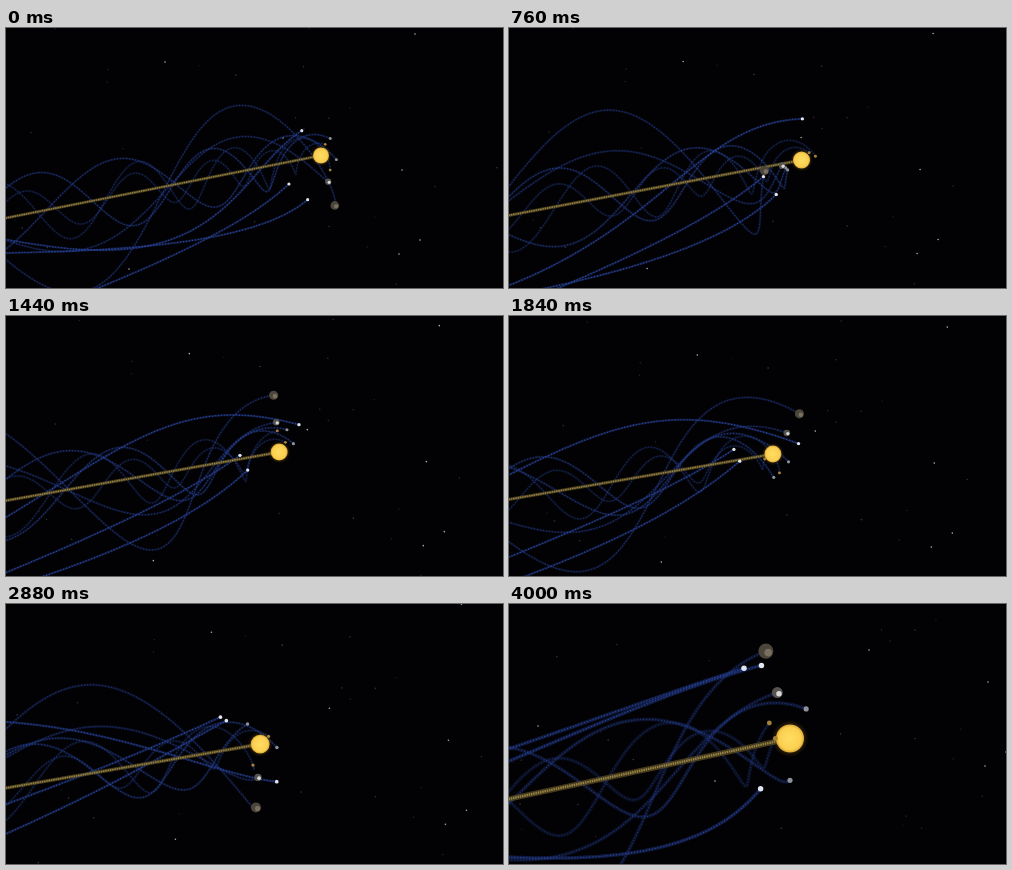
These frames come from a looping animation (497x260 px, 4.04 s). An HTML page:

```html
<!DOCTYPE html>
<html lang="en">
<head>
<meta charset="utf-8">
<title>Planets trailing the sun</title>
<style>
  html, body { margin: 0; width: 100%; height: 100%; overflow: hidden; background: #020103; }
  svg { display: block; width: 497px; height: 260px; }
  path { fill: none; stroke-linejoin: round; }
</style>
</head>
<body>
<svg id="stage" viewBox="0 0 497 260">
  <defs>
    <radialGradient id="sunFill">
      <stop offset="0" stop-color="#ffdd62"/>
      <stop offset=".8" stop-color="#fbcf50"/>
      <stop offset="1" stop-color="#d9a637"/>
    </radialGradient>
    <radialGradient id="glowFill">
      <stop offset=".6" stop-color="#9a7420" stop-opacity=".5"/>
      <stop offset="1" stop-color="#4a3208" stop-opacity="0"/>
    </radialGradient>
  </defs>
  <rect width="497" height="260" fill="#020103"/>
</svg>
<script>
const LOOP = 4040, STEP = 40, SPAN = 4000;
const DEPTH = 400;   // perspective distance along the axis
const FLATTEN = 90;  // how soon orbits turn edge-on towards the left
const ASPECT = .65;  // orbit width to height next to the sun
const RAD = Math.PI / 180;
const stage = document.getElementById('stage');

const orbit = (radius, phase, rate, look) => ({ radius, phase, rate, ...look });
const ember = { size: 1.5, color: '#a58238', glow: .35 };
const rock = { size: 1.6, color: '#8d929c', glow: .5 };
const ice = { size: 1.7, color: '#dfe4ee', glow: .75 };

// Radius in px, phase in degrees clockwise from the top, rate in degrees per ms
const planets = [
  orbit(14, 30, .51, ember),
  orbit(22, 136, .4, ember),
  orbit(24, 40, .27, rock),
  orbit(26, 100, .2, rock),
  orbit(42, -50, .068, ice),
  orbit(53, 205, .031, ice),
  orbit(62, 240, .0187, ice),
  orbit(31, 157, .135, { size: 3.4, color: '#56544f', glow: .45, core: '#d8d8d8' }),
  orbit(59, 157, .135, { size: 4.7, color: '#4b453b', glow: .45, core: '#77705f' })
];

// Cubic through four values spaced evenly over the loop
function cubic(t, a, b, c, d) {
  const w = 3 * t / SPAN;
  return -a * (w - 1) * (w - 2) * (w - 3) / 6 + b * w * (w - 2) * (w - 3) / 2
    - c * w * (w - 1) * (w - 3) / 2 + d * w * (w - 1) * (w - 2) / 6;
}

function cameraAt(t) {
  const x = cubic(t, 315, 276, 254, 281);
  const y = cubic(t, 127.5, 135.5, 140.2, 134.5);
  const r = cubic(t, 8, 8.5, 9, 14);
  const left = cubic(t, 190, 185, 183.3, 195);
  return {
    x, y, r,
    zoom: r / 8.7,
    tilt: (left - y) / x,
    speed: cubic(t, .057, .071, .084, .14),
    starX: cubic(t, -24, -1, 18, 59),
    starY: cubic(t, -3, 0, -4, -67)
  };
}

function seeded(seed) {
  return () => (seed = seed * 16807 % 2147483647) / 2147483647;
}

function set(node, attrs) {
  for (const name in attrs) node.setAttribute(name, attrs[name]);
}

function add(tag, attrs) {
  const node = document.createElementNS('http://www.w3.org/2000/svg', tag);
  set(node, attrs);
  return stage.appendChild(node);
}

// Where a planet was `lag` ms ago, carried back along the axis in perspective
function locate(planet, t, lag, cam) {
  const near = 1 / (1 - cam.speed * lag / (DEPTH * cam.zoom));
  const back = cam.speed * lag * near;
  const angle = (planet.phase + planet.rate * (t - lag)) * RAD;
  const height = planet.radius * cam.zoom * near;
  const width = height * ASPECT * Math.exp(-back / (FLATTEN * cam.zoom));
  return {
    x: cam.x - back + width * Math.sin(angle),
    y: cam.y + back * cam.tilt - height * Math.cos(angle),
    back
  };
}

function trailPath(planet, t, cam) {
  const points = [];
  for (let lag = 0; lag < 5000; lag += 20) {
    const p = locate(planet, t, lag, cam);
    points.push(p.x.toFixed(1) + ' ' + p.y.toFixed(1));
    if (p.back > cam.x + 60) break;
  }
  return 'M' + points.join('L');
}

const random = seeded(77);
const brightStars = [[433, 9], [420, 145], [301, 113], [438, 215], [147, 244], [183, 37], [417, 229], [-30, 189]];
const faintStars = Array.from({ length: 45 }, () => [random() * 600 - 60, random() * 340]);
const stars = [...brightStars, ...faintStars].map(([x, y], i) => ({
  x, y,
  node: add('circle', {
    r: .8, fill: '#e4e6ea',
    opacity: i < brightStars.length ? .75 : .08 + .2 * random()
  })
}));

for (const planet of planets) {
  planet.haze = add('path', { stroke: '#1b3176', opacity: planet.glow * .75 });
  planet.dots = add('path', {
    stroke: '#3c5cba', 'stroke-width': 1.1, 'stroke-dasharray': '1.1 1.9', opacity: planet.glow
  });
}

const axisHaze = add('line', { stroke: '#5a4d24', opacity: .75 });
const axisCore = add('line', { stroke: '#ad9754', 'stroke-dasharray': '1.5 .8', opacity: .8 });
const glow = add('circle', { fill: 'url(#glowFill)' });
const sun = add('circle', { fill: 'url(#sunFill)' });

for (const planet of planets) {
  planet.body = add('circle', { fill: planet.color });
  planet.spot = add('circle', { fill: planet.core || planet.color });
}

function draw(t) {
  const cam = cameraAt(t);
  for (const { x, y, node } of stars) set(node, { cx: x + cam.starX, cy: y + cam.starY });

  const axis = { x1: -5, y1: cam.y + cam.tilt * (cam.x + 5), x2: cam.x, y2: cam.y };
  set(axisHaze, { ...axis, 'stroke-width': 3.4 * cam.zoom });
  set(axisCore, { ...axis, 'stroke-width': 1.5 * cam.zoom });
  set(glow, { cx: cam.x, cy: cam.y, r: cam.r * 1.35 });
  set(sun, { cx: cam.x, cy: cam.y, r: cam.r });

  for (const planet of planets) {
    const d = trailPath(planet, t, cam);
    set(planet.haze, { d, 'stroke-width': 2.2 * cam.zoom });
    set(planet.dots, { d });
    const { x, y } = locate(planet, t, 0, cam);
    const r = planet.size * cam.zoom;
    set(planet.body, { cx: x, cy: y, r });
    set(planet.spot, { cx: x + r * .3, cy: y + r * .2, r: r * .5 });
  }
}

const start = performance.now();
function tick() {
  const t = (performance.now() - start) % LOOP;
  draw(Math.floor(t / STEP) * STEP);
  requestAnimationFrame(tick);
}
tick();
</script>
</body>
</html>
```
